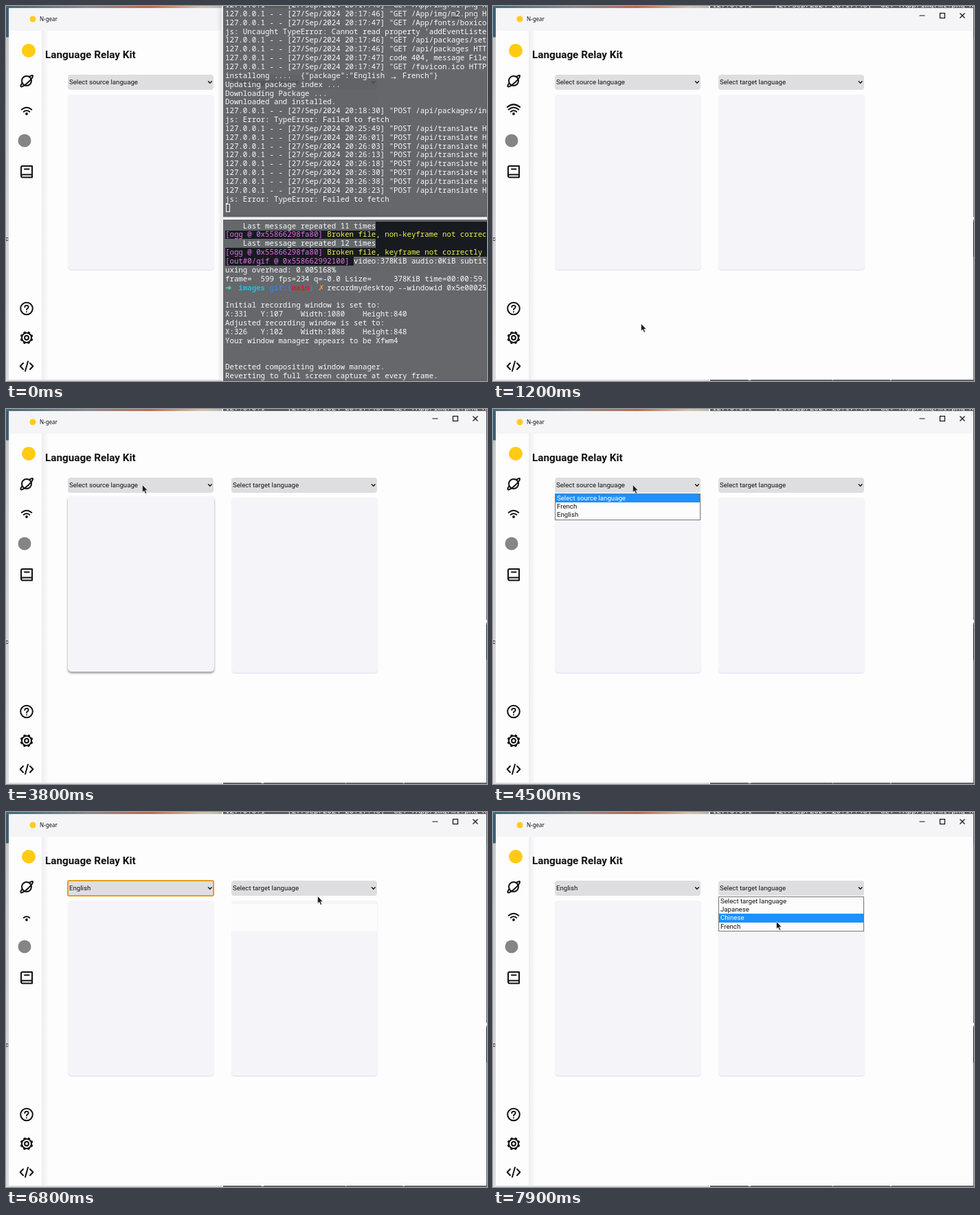
An HTML page that plays this animation: 700x546 px, repeating every 8 s.

```html
<!DOCTYPE html>
<html lang="en">
<head>
<meta charset="utf-8">
<title>Language Relay Kit</title>
<style>
html, body { margin: 0; width: 100%; height: 100%; overflow: hidden; }
#stage {
  position: relative; width: 700px; height: 546px; overflow: hidden;
  background: linear-gradient(90deg, #3f6a7c, #868a8e 120px, #c0694e 210px, #d0c4a8 285px, #b9b9b5 316px) 0 0 / 100% 3px no-repeat,
    linear-gradient(#3a5f72 45px, #c6c7c9 46px, #dcdcde);
  font: 9.66px Roboto, sans-serif; color: #111;
}
#stage div, pre, svg { position: absolute; box-sizing: border-box; }
svg { left: 0; top: 0; overflow: visible; fill: none; stroke: #111; }

/* terminals */
.term {
  left: 314px; width: 386px; z-index: 2; background: rgba(76, 79, 83, .86);
  border-left: 2px solid #f2f2f4; box-shadow: 0 0 8px rgba(0, 0, 0, .2);
}
#server { top: 0; height: 309px; border-bottom: 2px solid #f2f2f4; }
#shell { top: 309px; height: 237px; border-top: 2px solid #f8f8fa; }
pre { margin: 0; left: 3px; font: 10.75px/12.84px "Noto Sans Mono", monospace; color: #fafafa; }
#server pre { top: -7.9px; }
#shell pre { top: 2.6px; }
pre i { display: inline-block; width: 6.45px; height: 12.84px; vertical-align: top; font-style: normal; }
pre .long { width: 12.9px; font-size: 15px; text-align: center; }
pre s, pre u { text-decoration: none; }
pre s { color: #e070e6; }
pre u { color: #f2f04a; }
.dark { background: #171b20; left: 3px; right: 0; }
.plain { background: #65686b; left: 3px; width: 219px; height: 13px; }
.block { left: 4px; top: 288px; width: 6px; height: 12px; border: 1px solid #fafafa; }

/* application window */
#app { left: 0; top: 0; width: 700px; height: 546px; z-index: 1; }
.frame { left: 4px; top: 3px; width: 695px; height: 541px; background: #fdfdfd; }
.bar { left: 4px; top: 3px; width: 695px; height: 33px; background: #f5f4f6; }
.rail { left: 52px; top: 36px; width: 11px; height: 508px; background: linear-gradient(90deg, #eeedf0, #f8f8f9 60%, #fdfdfd); }
.brand { left: 49px; top: 13px; font: 8px/12px "Noto Sans", sans-serif; }
.title { left: 57px; top: 62px; font: bold 15.25px/18px Roboto, sans-serif; white-space: nowrap; }
.select { top: 100px; width: 212px; height: 22px; border-radius: 4px; background: #dedee0; line-height: 22px; }
.select span { position: absolute; left: 2.5px; white-space: nowrap; }
.area { top: 129px; width: 213px; height: 255px; border-radius: 5px; background: #f5f4f8; box-shadow: 0 1px 1px #e2daf0; }
.source { left: 89.5px; }
.target { left: 327.5px; }
.ring { left: 88.5px; top: 99px; width: 214px; height: 24px; border: 2px solid #e59d1c; border-radius: 3px; }
.list { top: 123px; width: 212px; border: 1px solid #777; background: #fcfcfc; }
#stage .list div { position: static; height: 12.2px; line-height: 12.2px; padding-left: 2.5px; }
.blank { left: 327px; top: 134px; width: 213px; height: 39px; background: #fcfcfd; }
.caret { left: 94px; top: 135px; width: 1px; height: 12px; background: #222; }
#pointer { left: 0; top: 0; z-index: 9; animation: path 8s linear infinite; }

/* hard switches */
.a { animation: 8s step-end infinite; }
@keyframes raise { 0% { z-index: 1 } 14.9% { z-index: 3 } }
@keyframes arrow { 0%, 28% { opacity: 0 } 8.7%, 43.4% { opacity: 1 } }
@keyframes beam { 0%, 43.4% { opacity: 0 } 28% { opacity: 1 } }
@keyframes wave2 { 0%, 46.2%, 92.4% { opacity: 1 } 23.7%, 69.9% { opacity: 0 } }
@keyframes wave3 { 0%, 23.7%, 69.9% { opacity: 0 } 12.4%, 58.7% { opacity: 1 } }
@keyframes caret { 0%, 31.2%, 43.7% { opacity: 0 } 28.7%, 37.4% { opacity: 1 } }
@keyframes hover {
  0%, 48.6% { transform: none; box-shadow: 0 1px 1px #e2daf0 }
  28% { transform: translateY(-1.5px); box-shadow: 0 2px 3px #8b8b90 }
}
@keyframes prompt { 0% { opacity: 1 } 66.1% { opacity: 0 } }
@keyframes french { 0%, 74.9% { opacity: 0 } 66.1% { opacity: 1 } }
@keyframes english { 0% { opacity: 0 } 74.9% { opacity: 1 } }
@keyframes ring { 0%, 86.1% { opacity: 0 } 66.1% { opacity: 1 } }
@keyframes sourceList { 0%, 66.1%, 74.9% { opacity: 0 } 56.1%, 72.4% { opacity: 1 } }
@keyframes targetList { 0% { opacity: 0 } 86.1% { opacity: 1 } }
@keyframes blank { 0%, 86.1% { opacity: 0 } 84.9% { opacity: 1 } }
@keyframes s0 { 0% { background: #1e90ff; color: #fff } 61.1% { background: none; color: #111 } }
@keyframes s1 { 0%, 73.6% { background: none; color: #111 } 61.1% { background: #1e90ff; color: #fff } }
@keyframes s2 { 0% { background: none; color: #111 } 73.6% { background: #1e90ff; color: #fff } }
@keyframes t0 { 0% { background: #1e90ff; color: #fff } 87.4% { background: none; color: #111 } }
@keyframes t1 { 0%, 88.6% { background: none; color: #111 } 87.4% { background: #1e90ff; color: #fff } }
@keyframes t2 { 0%, 91.1% { background: none; color: #111 } 88.6%, 97.4% { background: #1e90ff; color: #fff } }
@keyframes t3 { 0%, 97.4% { background: none; color: #111 } 91.1% { background: #1e90ff; color: #fff } }

@keyframes path {
  0%, 8.75% { transform: translate(576px, 385px) }
  12.4%, 15.9% { transform: translate(215px, 462px) }
  25% { transform: translate(452px, 115px) }
  28.75%, 38.75% { transform: translate(187px, 222px) }
  43.75% { transform: translate(187px, 124px) }
  47.4%, 48.6% { transform: translate(198px, 110px) }
  53.75%, 57.4% { transform: translate(203px, 110px) }
  63.75%, 66% { transform: translate(192px, 143px) }
  70%, 72.2% { transform: translate(185px, 120px) }
  73.75%, 75% { transform: translate(190px, 151px) }
  76.25%, 77.5% { transform: translate(375px, 150px) }
  84.8%, 86.1% { transform: translate(453px, 122px) }
  88.75%, 90% { transform: translate(430px, 150px) }
  93.75% { transform: translate(424px, 238px) }
  98%, 100% { transform: translate(412px, 159px) }
}
</style>
</head>
<body>
<div id="stage">
  <div id="server" class="term">
<pre>127.0.0.1 - - [27/Sep/2024 20:17:46] "GET /App/img/m1.png H
127.0.0.1 - - [27/Sep/2024 20:17:46] "GET /App/img/m2.png H
127.0.0.1 - - [27/Sep/2024 20:17:47] "GET /App/fonts/boxico
js: Uncaught TypeError: Cannot read property 'addEventListe
127.0.0.1 - - [27/Sep/2024 20:17:46] "GET /api/packages/set
127.0.0.1 - - [27/Sep/2024 20:17:46] "GET /api/packages HTT
127.0.0.1 - - [27/Sep/2024 20:17:47] code 404, message File
127.0.0.1 - - [27/Sep/2024 20:17:47] "GET /favicon.ico HTTP
installong ....  {"package":"English <i class="long">→</i> French"}
Updating package index ...
Downloading Package ...
Downloaded and installed.
127.0.0.1 - - [27/Sep/2024 20:18:30] "POST /api/packages/in
js: Error: TypeError: Failed to fetch
127.0.0.1 - - [27/Sep/2024 20:25:49] "POST /api/translate H
127.0.0.1 - - [27/Sep/2024 20:26:01] "POST /api/translate H
127.0.0.1 - - [27/Sep/2024 20:26:03] "POST /api/translate H
127.0.0.1 - - [27/Sep/2024 20:26:13] "POST /api/translate H
127.0.0.1 - - [27/Sep/2024 20:26:18] "POST /api/translate H
127.0.0.1 - - [27/Sep/2024 20:26:30] "POST /api/translate H
127.0.0.1 - - [27/Sep/2024 20:26:38] "POST /api/translate H
127.0.0.1 - - [27/Sep/2024 20:28:23] "POST /api/translate H
js: Error: TypeError: Failed to fetch</pre>
    <div class="block"></div>
  </div>

  <div id="shell" class="term">
    <div class="dark" style="top:2.6px;height:51.4px"></div>
    <div class="dark" style="top:54px;height:13px;right:auto;width:187px"></div>
    <div class="plain" style="top:2.6px"></div>
    <div class="plain" style="top:28.3px"></div>
<pre>    Last message repeated 11 times
<s>[ogg @ 0x55866298fa80]</s> <u>Broken file, non-keyframe not correc</u>
    Last message repeated 12 times
<s>[ogg @ 0x55866298fa80]</s> <u>Broken file, keyframe not correctly m</u>
<s>[out#0/gif @ 0x558662992100]</s> video:378KiB audio:0KiB subtit
uxing overhead: 0.005168%
frame=  599 fps=234 q=-0.0 Lsize=     378KiB time=00:00:59.
<b><i style="color:#3fd8b0">➜</i>  <span style="color:#2cb8e0">images</span> <span style="color:#3a80e0">git:(<span style="color:#e01c1c">main</span>)</span></b> <i style="color:#f0a030">✗</i> recordmydesktop --windowid 0x5e00025

Initial recording window is set to:
X:331   Y:107    Width:1080    Height:840
Adjusted recording window is set to:
X:326   Y:102    Width:1088    Height:848
Your window manager appears to be Xfwm4


Detected compositing window manager.
Reverting to full screen capture at every frame.</pre>
  </div>

  <div id="app" class="a" style="animation-name:raise">
    <div style="left:-1px;top:334px;font-size:9px">c</div>
    <div class="frame"></div>
    <div class="bar"></div>
    <div class="rail"></div>
    <div class="brand">N-gear</div>
    <div class="title">Language Relay Kit</div>

    <div class="area source a" style="animation-name:hover"></div>
    <div class="area target"></div>
    <div class="caret a" style="animation-name:caret"></div>
    <div class="select source">
      <span class="a" style="animation-name:prompt">Select source language</span>
      <span class="a" style="animation-name:french">French</span>
      <span class="a" style="animation-name:english">English</span>
    </div>
    <div class="select target"><span>Select target language</span></div>
    <div class="ring a" style="animation-name:ring"></div>

    <svg width="700" height="546" stroke-width="2" stroke-linecap="round" stroke-linejoin="round">
      <g stroke="none">
        <circle cx="39" cy="19" r="4.5" fill="#ffcb1c"/>
        <circle cx="33" cy="65" r="10" fill="#ffcb12"/>
        <circle cx="27" cy="196" r="9.5" fill="#858585"/>
      </g>
      <g stroke-width="1.2" stroke-linecap="butt" stroke-linejoin="miter">
        <path d="M620.5 14H628.5M679.5 10.5l7 7m0-7l-7 7"/>
        <rect x="650.5" y="10.5" width="7" height="7"/>
      </g>
      <path d="M294.5 109.8l2.4 2.4 2.4-2.4M532.3 109.8l2.4 2.4 2.4-2.4" stroke-width="1.4"/>

      <g transform="translate(30 109)">
        <circle r="7"/>
        <path d="M4.5-6.3C8-8.6 9.6-8.4 8.8-6 7.4-2 -2 6.3-6.4 8.2-9.5 9.2-9.2 6.6-6.6 3.4"/>
      </g>
      <circle cx="30" cy="157" r="1.9" fill="#111" stroke="none"/>
      <path d="M25.7 154Q30 150.6 34.3 154"/>
      <path class="a" style="animation-name:wave2" d="M22.8 150.8Q30 144.8 37.2 150.8"/>
      <path class="a" style="animation-name:wave3" d="M20.8 147.2Q30 139.6 39.2 147.2"/>
      <path d="M38 245.5V233H24Q22 233 22 235V247Q22 249.5 24.5 249.5H38V245.5H24.5Q22 245.5 22 247.5M27 237.5H33.5"/>

      <circle cx="30" cy="440.5" r="8.8"/>
      <path d="M27.3 438.5Q27.3 435.8 30 435.8T32.7 438.3Q32.7 439.6 31.2 440.4T30 442.4M30 445.2v.2" stroke-width="1.8"/>
      <g transform="translate(30 483)">
        <circle r="2.9"/>
        <circle r="7"/>
        <circle r="8.3" stroke-width="2.2" stroke-linecap="butt" stroke-dasharray="3.26" transform="rotate(11)"/>
      </g>
      <path d="M25 520l-4.3 4.5 4.3 4.5M35 520l4.3 4.5-4.3 4.5M32 517.5l-4 14"/>
    </svg>

    <div class="list source a" style="animation-name:sourceList">
      <div class="a" style="animation-name:s0">Select source language</div>
      <div class="a" style="animation-name:s1">French</div>
      <div class="a" style="animation-name:s2">English</div>
    </div>
    <div class="blank a" style="animation-name:blank"></div>
    <div class="list target a" style="animation-name:targetList">
      <div class="a" style="animation-name:t0">Select target language</div>
      <div class="a" style="animation-name:t1">Japanese</div>
      <div class="a" style="animation-name:t2">Chinese</div>
      <div class="a" style="animation-name:t3">French</div>
    </div>
  </div>

  <svg id="pointer" width="10" height="16" stroke-width=".6">
    <path class="a" style="animation-name:arrow" d="M.5.5V11.2L2.9 9 4.8 13.2 6.6 12.4 4.8 8.4H8Z" fill="#1a1a1c" stroke="#f4f4f4"/>
    <path class="a" style="animation-name:beam" d="M1.5 1.5H6.5M4 1.5V12.5M1.5 12.5H6.5" stroke-width="1.2"/>
  </svg>
</div>
</body>
</html>
```
